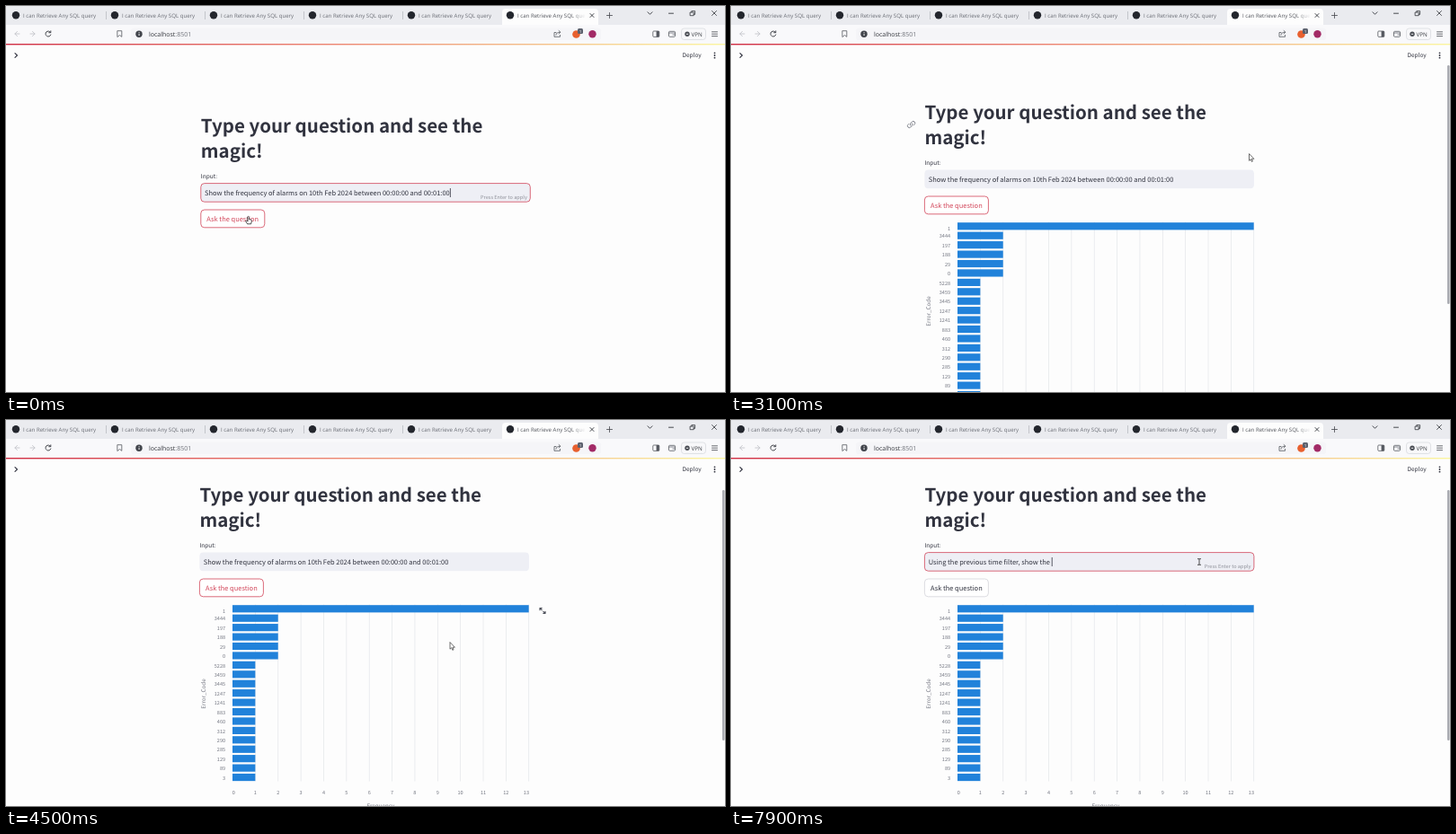
An HTML page with a canvas for the animation above (8 s loop, 800 by 430 pixels).

```html
<!DOCTYPE html>
<html lang="en">
<head>
<meta charset="utf-8">
<title>Ask the database</title>
<style>
html, body { margin: 0; width: 100%; height: 100%; overflow: hidden; background: #fdfdfd; }
canvas { display: block; width: 800px; height: 430px; }
</style>
</head>
<body>
<canvas id="stage" width="800" height="430"></canvas>
<script>
const ctx = document.getElementById('stage').getContext('2d');
const LOOP = 8000, STEP = 100;
const APP = '"Noto Sans CJK SC", "Noto Sans CJK JP", "Noto Sans", sans-serif';
const UI = '"Open Sans", "Noto Sans", sans-serif';
const INK = '#31333f', PAGE = '#fdfdfd', RED = '#d2465a', ICON = '#55585f';
const FIRST = 'Show the frequency of alarms on 10th Feb 2024 between 00:00:00 and 00:01:00';
const SECOND = 'Using the previous time filter, show the ';
const CODES = [1, 3444, 197, 188, 29, 0, 5228, 3459, 3445, 1247, 1241, 883, 460, 312, 290, 285, 129, 89, 3];
const LOADED = 2800, ASKED = 400, FOCUSED = 4900, SELECTED = 5600, TYPING = 6000;
const BODY = 7.48;

// Each key is [time, value, ...]
const POINTER = [[0, 270, 238], [500, 270, 238], [1200, 498, 157], [2300, 498, 157], [2900, 576.5, 165],
  [3150, 576.5, 165], [3700, 488, 268], [4350, 488, 268], [4900, 521, 158], [LOOP, 521, 158]];
const SCROLL = [[0, 0], [3000, 0], [3100, 15], [3300, 50], [3500, 50], [3750, 100], [4100, 100],
  [4200, 89.5], [4400, 50], [LOOP, 50]];
const THUMB = [[0, 42, 321], [3000, 42, 321], [3100, 66, 332], [3300, 78, 357], [3500, 78, 357],
  [3750, 114, 393], [4100, 114, 393], [4200, 106, 385], [4400, 78, 357], [LOOP, 78, 357]];

function track(keys, t) {
  let i = 1;
  while (i < keys.length - 1 && t > keys[i][0]) i++;
  const a = keys[i - 1], b = keys[i];
  const u = Math.min(1, Math.max(0, (t - a[0]) / (b[0] - a[0])));
  const e = u * u * (3 - 2 * u);
  return a.slice(1).map((v, k) => v + (b[k + 1] - v) * e);
}

function text(s, x, y, size, color = INK, { font = APP, weight = 400, align = 'left' } = {}) {
  ctx.font = `${weight} ${size}px ${font}`;
  ctx.textAlign = align;
  ctx.fillStyle = color;
  ctx.fillText(s, x, y);
  return ctx.measureText(s).width;
}

function rect(x, y, w, h, color) {
  ctx.fillStyle = color;
  ctx.fillRect(x, y, w, h);
}

function box(x, y, w, h, r, fill, stroke, width = 0.8) {
  ctx.beginPath();
  ctx.roundRect(x, y, w, h, r);
  if (fill) { ctx.fillStyle = fill; ctx.fill(); }
  if (stroke) { ctx.strokeStyle = stroke; ctx.lineWidth = width; ctx.stroke(); }
}

function dot(x, y, r, color) {
  ctx.beginPath();
  ctx.arc(x, y, r, 0, Math.PI * 2);
  ctx.fillStyle = color;
  ctx.fill();
}

function line(d, x, y, color = ICON, width = 0.9, fill) {
  const p = new Path2D(d);
  ctx.save();
  ctx.translate(x, y);
  ctx.lineWidth = width;
  ctx.lineCap = ctx.lineJoin = 'round';
  ctx.strokeStyle = color;
  if (fill) { ctx.fillStyle = fill; ctx.fill(p); }
  ctx.stroke(p);
  ctx.restore();
}

function tabs() {
  rect(0, 0, 800, 21, '#eaebef');
  box(552, 3, 107, 20, [4, 4, 0, 0], PAGE);
  for (let i = 0; i < 6; i++) {
    const x = 11 + i * 110;
    let color = '#6a6d75';
    if (i === 5) {
      color = ctx.createLinearGradient(628, 0, 645, 0);
      color.addColorStop(0, '#50535a');
      color.addColorStop(1, 'rgba(80,83,90,0)');
    }
    dot(x, 10.2, 4.2, '#23262d');
    text('I can Retrieve Any SQL query', x + 8, 12.6, 6.1, color, { font: UI });
    if (i < 4) rect(x + 100, 6, 0.7, 9, '#b2b5bb');
  }
  line('M-2-2L2 2M2-2L-2 2', 652, 10.5, '#33363c', 0.9);
  line('M-3 0H3M0-3V3', 671.5, 10.5, '#44474d', 0.8);
  line('M-2.5-1.2L0 1.3L2.5-1.2', 716.5, 8, '#33363c', 0.9);
  line('M-2.5 0H2.5', 740, 8.2, '#33363c', 0.9);
  line('M-2.5-1H1.2V2.7H-2.5ZM-1.2-1V-2.4H2.6V1.4H1.2', 764, 8, '#33363c', 0.8);
  line('M-2.5-2.5L2.5 2.5M2.5-2.5L-2.5 2.5', 788, 8, '#33363c', 0.8);
}

function toolbar() {
  rect(0, 21, 800, 21, '#f9f9fb');
  line('M2.5 0H-2.5M0-2.6L-2.6 0L0 2.6', 12.5, 31, '#c3c5ca', 0.9);
  line('M-2.5 0H2.5M0-2.6L2.6 0L0 2.6', 29.5, 31, '#c3c5ca', 0.9);
  line('M2.6-1.6A3 3 0 1 0 2.9 1M2.8-3.2V-1.3H.8', 47, 31, '#44474d', 1);
  line('M-2.3-3.3H2.3V3.3L0 1.5L-2.3 3.3Z', 126.5, 31, ICON, 0.8);
  box(139, 24.5, 523, 13.5, 3, '#f5f5f8');
  dot(148, 31.2, 3.7, '#41444b');
  rect(147.6, 30.7, 0.9, 2.4, '#fff');
  rect(147.6, 29.1, 0.9, 0.9, '#fff');
  const w = text('localhost', 159, 33.8, 7, '#34373d', { font: UI });
  text(':8501', 159 + w, 33.8, 7, '#70737a', { font: UI });
  line('M-1.5-1.5H-3.5V3.3H3V1.4M-1.5 1.2C-1.3-.8 0-1.8 3.2-1.8M1.6-3.5L3.4-1.8L1.6 0', 613.5, 31, ICON, 0.8);
  dot(634.5, 31.5, 4.3, '#e8602f');
  box(636, 25, 6, 6, 1.5, '#5a5f6c');
  text('1', 639, 29.8, 4.6, '#fff', { font: UI, align: 'center' });
  dot(652.5, 31.2, 4.2, '#a22a66');
  box(719.8, 28, 7, 6.4, 1, null, ICON);
  rect(723.6, 28, 3.2, 6.4, ICON);
  box(737.5, 28.3, 7, 6, 1, null, ICON);
  line('M-3.5-1H3.5M1 1H3.5', 741, 31, ICON, 0.7);
  box(751.5, 25, 27, 12.5, 3, '#f8f8fa', '#d5d7dc', 0.7);
  dot(758, 31.2, 2.7, '#4a4d54');
  rect(756.8, 30.8, 2.4, 0.9, '#fff');
  text('VPN', 762.5, 33.5, 6.3, '#3d4046', { font: UI });
  line('M-3-2.4H3M-3 0H3M-3 2.4H3', 788.5, 31.2, '#44474d', 0.8);
}

function header(running) {
  const g = ctx.createLinearGradient(0, 0, 800, 0);
  g.addColorStop(0, '#d02c43');
  g.addColorStop(0.45, '#ec8470');
  g.addColorStop(1, '#fbf5a0');
  rect(0, 42, 800, 1.4, g);
  line('M-1.3-2.3L1.2 0L-1.3 2.3', 11.3, 55, INK, 1.1);
  text('Deploy', 752.5, 57.3, 6.5);
  for (let i = -1; i < 2; i++) dot(788.5, 55 + i * 2.7, 0.9, INK);
  if (!running) return;
  dot(671, 50.6, 1.5, '#8b8d96');
  line('M670 53L667.5 56.5L671 58L669.5 61M667.5 56.5L666.5 59.5H664M665 55L667 52.5L670 53L671.5 55H673.5',
    0, 0, '#8b8d96', 1.2);
  text('RUNNING...', 680, 57.3, 6.5, '#a9abb3');
  text('Stop', 725, 57.3, 6.5);
}

function chart() {
  const x0 = 252, unit = 25.36, top = 255.5, pitch = 10.43;
  const faint = '#747782', size = 5.5;
  for (let k = 0; k <= 13; k++) {
    const x = x0 + k * unit;
    if (k) rect(x - 0.3, top, 0.7, 197, '#e3e5e9');
    const label = k === 0 ? x + 1.2 : k === 13 ? x - 2.8 : x;
    text(k, label, 466.8, size, faint, { align: 'center' });
  }
  CODES.forEach((code, i) => {
    const y = 260.2 + i * pitch, n = i === 0 ? 13 : i < 6 ? 2 : 1;
    rect(x0, y - 4, n * unit, 8.2, '#2182da');
    text(code, 244, y + (i ? 2.8 : 4.6), size, faint, { align: 'right' });
  });
  text('Frequency', 417, 481.8, 6.3, faint, { align: 'center' });
  ctx.save();
  ctx.translate(222, 355);
  ctx.rotate(-Math.PI / 2);
  text('Error_Code', 0, 0, 6.3, faint, { align: 'center' });
  ctx.restore();
}

function field(x, t) {
  const dirty = t < ASKED - 100 || t >= TYPING;
  const focus = t < ASKED - 100 || t >= FOCUSED;
  const typed = Math.max(0, Math.min(SECOND.length, Math.round(15 + (t - 6700) * 26 / 1200)));
  const value = t >= TYPING ? SECOND.slice(0, typed) : FIRST;
  const selected = t >= SELECTED && t < TYPING;
  box(x, 197.6, 366.5, 20.6, 4, '#eeeff5', focus ? RED : null);
  if (selected) {
    ctx.font = `400 ${BODY}px ${APP}`;
    rect(x + 4.3, 203, ctx.measureText(value).width, 10, '#3390ff');
  }
  const w = text(value, x + 4.3, 210.8, BODY, selected ? '#fff' : INK);
  if (focus && !selected) rect(x + 4.5 + w, 203, 0.8, 10, INK);
  if (dirty) text('Press Enter to apply', x + 363, 215.2, 5.6, '#8e9099', { align: 'right' });
}

function content(t, scroll, px, py) {
  const loaded = t >= LOADED;
  const x = loaded ? 215.4 : 216.8;
  const docY = py + scroll;
  ctx.save();
  ctx.beginPath();
  ctx.rect(0, 66, 796, 364);
  ctx.clip();
  ctx.translate(0, -scroll);
  text('Type your question and see the', x, 141.2, 20.5, INK, { weight: 700 });
  text('magic!', x, 168.7, 20.5, INK, { weight: 700 });
  if (docY > 100 && docY < 187) {
    line('M-.8 1.2A2 2 0 0 1-.8-1.4L1-3.2A2 2 0 0 1 3.8-.4L2.8.6M.8-1.2A2 2 0 0 1 .8 1.4L-1 3.2A2 2 0 0 1-3.8 .4L-2.8-.6',
      x - 14.8, 147, '#767983', 0.9);
  }
  text('Input:', x, 191.5, 6.5);
  field(x, t);
  const red = t < FOCUSED;
  box(x, 227, 71, 19.8, 4, '#fff', red ? RED : '#d3d4da');
  text('Ask the question', x + 35.4, 239.8, BODY, red ? RED : INK, { align: 'center' });
  if (loaded) {
    chart();
    if (docY > 252 && px < 585) {
      line('M-.8-.8L-3-3M-3-.8V-3H-.8M.8 .8L3 3M3 .8V3H.8', 597, 262.5, '#4a4d57', 1.1);
    }
  } else if (t >= ASKED) {
    const turn = (t - 1400) / 750 * Math.PI * 2 + 0.45;
    ctx.lineWidth = 1.3;
    ctx.lineCap = 'butt';
    for (const [from, to, color] of [[0, 6.3, '#d9dae0'], [turn - 0.8, turn + 0.8, '#2b7fc9']]) {
      ctx.beginPath();
      ctx.arc(x + 5.4, 261.8, 5, from, to);
      ctx.strokeStyle = color;
      ctx.stroke();
    }
    text('Fetching data......', x + 15.6, 264.6, BODY);
  }
  ctx.restore();
}

function pointer(x, y, scroll) {
  const docY = y + scroll;
  const inside = (x0, x1, y0, y1) => x > x0 && x < x1 && docY > y0 && docY < y1;
  if (inside(216, 288, 227, 247)) {
    line('M-1.2-4Q-.4-5 .3-4V-1.2L2.6-.7Q3.6-.3 3.4 .8L2.6 4H-1.4L-3.4 .8Q-3-.4-1.2 .8Z', x, y + 0.8, '#222', 0.8, '#fff');
  } else if (inside(216, 583, 197, 218)) {
    line('M-1.6-3.3H-.5L0-3L.5-3.3H1.6M0-3V3M-1.6 3.3H-.5L0 3L.5 3.3H1.6', x, y, '#222', 0.8);
  } else {
    line('M0 0V7.3L1.7 5.8L2.8 8.4L4 7.9L2.9 5.3H5Z', x, y, '#333', 0.7, '#fff');
  }
}

function draw(now) {
  const t = Math.floor((now % LOOP) / STEP) * STEP;
  const [px, py] = track(POINTER, t);
  const [scroll] = track(SCROLL, t);
  ctx.textRendering = 'geometricPrecision';
  rect(0, 0, 800, 430, PAGE);
  content(t, scroll, px, py);
  tabs();
  toolbar();
  header(t >= ASKED && t < LOADED);
  if (t >= LOADED) {
    const [a, b] = track(THUMB, t);
    const top = Math.max(a, 43);
    box(797, top, 2.6, b - top, 1.3, '#a9abb1');
  }
  pointer(px, py, scroll);
}

let start;
function loop(now) {
  if (start === undefined) start = now;
  draw(now - start);
  requestAnimationFrame(loop);
}
requestAnimationFrame(loop);
</script>
</body>
</html>
```
